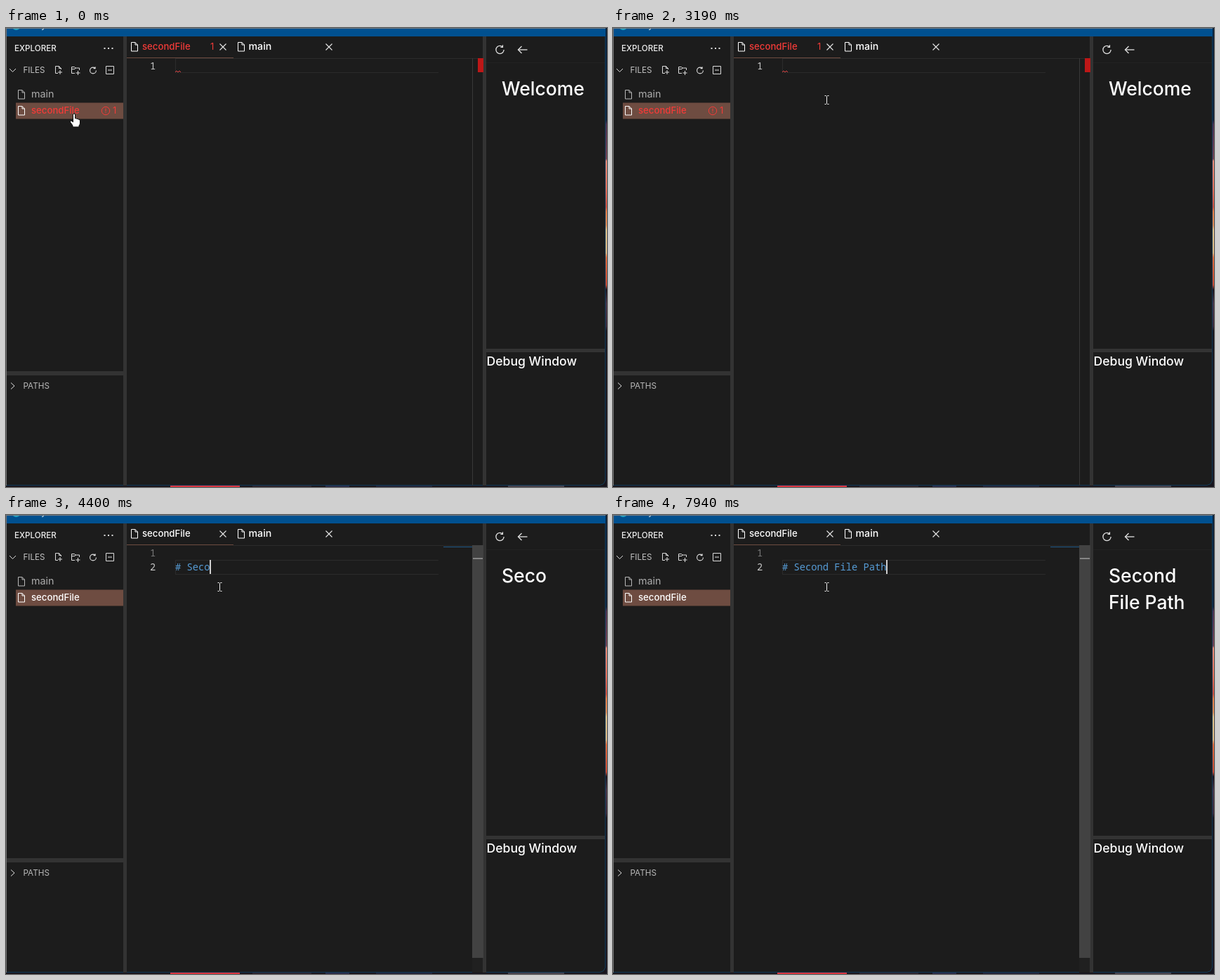
Recreate the animation shown at these times as an HTML page with a canvas. Size 856 by 654 pixels, loop 8 s.

```html
<!DOCTYPE html>
<html lang="en">
<head>
<meta charset="utf-8">
<title>Editor</title>
<style>
html, body { margin: 0; width: 100%; height: 100%; overflow: hidden; background: #1c1c1c; }
canvas { display: block; width: 856px; height: 654px; }
</style>
</head>
<body>
<canvas id="stage" width="856" height="654"></canvas>
<script>
const ctx = document.getElementById('stage').getContext('2d');
const LOOP = 8000;
const SANS = 'Inter, "Open Sans", sans-serif';
const MONO = '"Noto Sans Mono", "DejaVu Sans Mono", monospace';
const BG = '#1c1c1c', BAR = '#333333', RED = '#f23b38', WHITE = '#ffffff';
const CHAR = 8.25, CODE_X = 241;

// [start, typed text]; null = still the empty one-line file
const typing = [
  [0, null], [3460, ''], [3730, '# '], [3880, '# S'], [4020, '# Se'], [4400, '# Seco'],
  [4660, '# Secon'], [4790, '# Second'], [4920, '# Second '], [5050, '# Second F'],
  [5180, '# Second Fi'], [5310, '# Second Fil'], [5690, '# Second File'],
  [6350, '# Second File '], [6610, '# Second File P'], [6750, '# Second File Pa'],
  [6880, '# Second File Path']
];
const caretOn = [
  [0, false], [2690, true], [3190, false], [3460, true], [6200, false],
  [6350, true], [7410, false], [7940, true]
];
const pointer = [
  [0, hand, 97, 122], [250, arrow, 112, 147], [377, arrow, 138, 136],
  [503, beam, 206, 152], [630, beam, 230, 138], [757, beam, 268, 110],
  [883, beam, 287, 74], [1010, beam, 251, 57], [1770, beam, 249, 57],
  [1900, beam, 248, 57], [2810, beam, 276, 80], [2930, beam, 304, 102],
  [3880, hand, 304, 102], [4400, beam, 304, 102]
];

function at(list, t) {
  let now = list[0];
  for (const item of list) if (item[0] <= t) now = item;
  return now;
}

function rect(x, y, w, h, color) {
  ctx.fillStyle = color;
  ctx.fillRect(x, y, w, h);
}

function text(str, x, y, size, color, font = SANS, weight = 400) {
  ctx.font = `${weight} ${size}px ${font}`;
  ctx.fillStyle = color;
  ctx.fillText(str, x, y);
}

const code = (str, x, y, color, weight) => text(str, x, y, 13.75, color, MONO, weight);
const label = (str, x, y, size, color) => text(str, x, y, size, color, SANS, 500);

function line(points, color = '#dddddd', width = 1) {
  ctx.beginPath();
  points.forEach(([x, y], i) => i ? ctx.lineTo(x, y) : ctx.moveTo(x, y));
  ctx.strokeStyle = color;
  ctx.lineWidth = width;
  ctx.stroke();
}

function shape(d, x, y, stroke, fill, width = 1) {
  const path = new Path2D(d);
  ctx.save();
  ctx.translate(x, y);
  if (fill) { ctx.fillStyle = fill; ctx.fill(path); }
  if (stroke) { ctx.strokeStyle = stroke; ctx.lineWidth = width; ctx.stroke(path); }
  ctx.restore();
}

function hand(x, y) {
  shape('M-1.5 1Q0 -1 1.5 1V7Q3 6 4 7.5Q6 7 6.5 8.5Q8.500 8 8.500 10V14Q8 16 7 17V19H-2V17L-5.500 12Q-6 10 -4 10L-1.5 12Z',
    x, y, '#111111', WHITE);
}

function arrow(x, y) {
  shape('M0 0V16L3.700 12.500L6.300 18.500L8.700 17.500L6.200 11.700H11Z', x, y, '#111111', WHITE);
}

function beam(x, y) {
  shape('M-3 -6H-1L0 -5L1 -6H3M0 -5V5M-3 6H-1L0 5L1 6H3', x + .5, y + .5, '#f0f0f0');
}

function fileIcon(x, y, color) {
  shape('M0 0H5.500L9 3.500V12.500H0ZM5.500 0V3.500H9', x + .5, y + .5, color);
}

function cross(x, y) {
  shape('M-4.500 -4.500L4.500 4.500M4.500 -4.500L-4.500 4.500', x, y, '#e6e6e6', null, 1.1);
}

function refresh(x, y, r, width) {
  ctx.beginPath();
  ctx.arc(x, y, r, 0, Math.PI * 1.74);
  ctx.strokeStyle = '#e2e2e2';
  ctx.lineWidth = width;
  ctx.stroke();
  line([[x + r * .7, y - r * 1.2], [x + r * .7, y - r * .65], [x + r * .15, y - r * .65]], '#e2e2e2', width);
}

function wallpaper() {
  const strip = ctx.createLinearGradient(0, 0, 0, 654);
  [[0, '#08213b'], [.2, '#0c2038'], [.21, '#49314f'], [.285, '#704052'], [.29, '#e58a78'],
   [.35, '#e0705c'], [.39, '#c94f40'], [.4, '#e57f48'], [.43, '#d98a58'], [.44, '#dcc08c'],
   [.49, '#d8b684'], [.5, '#dd6a3c'], [.56, '#c44a34'], [.57, '#151019'], [.6, '#433347'],
   [.65, '#38283a'], [.66, '#14141d'], [1, '#17151f']].forEach(s => strip.addColorStop(...s));
  rect(0, 0, 856, 654, '#17151d');
  rect(853, 0, 3, 654, strip);
  rect(234, 652, 99, 2, '#d8343f');
  rect(351, 652, 84, 2, '#29232e');
  rect(455, 652, 34, 2, '#282c4a');
  rect(527, 652, 80, 2, '#202339');
  rect(715, 652, 80, 2, '#44404b');
}

function chrome() {
  wallpaper();
  ctx.fillStyle = BG;
  ctx.beginPath();
  ctx.roundRect(0, 0, 854, 652, [0, 0, 7, 0]);
  ctx.fill();
  line([[853.5, 0], [853.5, 645], [851, 649.5], [846, 651.5], [0, 651.5]], '#123b59');
  rect(0, 0, 854, 12, '#00508f');
  ctx.fillStyle = '#22a6c4';
  ctx.beginPath();
  ctx.arc(14.5, -3, 6, 0, Math.PI * 2);
  ctx.fill();
  text('Diary', 25, 0, 13, '#d5e3ef');
  rect(0, 0, 854, 1, '#747b82');
  rect(0, 0, 1, 652, '#747474');
  rect(167, 12, 5, 640, BAR);
  rect(679, 12, 5, 640, BAR);
  rect(1, 489, 167, 6, BAR);
  rect(684, 457, 169, 5, BAR);
}

function sidebar(error) {
  label('EXPLORER', 12, 33, 11.6, '#eeeeee');
  for (const x of [140.5, 146, 151.5]) rect(x - 1, 28, 2, 2, '#dddddd');
  line([[5, 58], [9.5, 62.5], [14, 58]]);
  text('FILES', 24.5, 64, 11.6, '#c4c4c4');
  shape('M4 10.500H.5V.5H5.500L8.500 3.500V5M5.500 .5V3.500H8.500M7 6V12M4 9H10', 70, 54, '#dddddd');
  shape('M5 9.500H.5V.5H4.500L6 2H11.500V5M.5 3.500H5L6 2M9.500 6V12M6.500 9H12.500', 93, 55, '#dddddd');
  refresh(124, 60.5, 4.4, 1.1);
  shape('M.5 .5H11.500V11.500H.5ZM3 6H9', 142, 54, '#dddddd');

  fileIcon(17, 88, '#b8b8b8');
  text('main', 36, 99, 14.3, '#adadad');
  rect(14, 106.5, 153, 23, '#6e4c41');
  fileIcon(17, 111, '#ffffff');
  label('secondFile', 36, 122, 13.2, error ? RED : WHITE);
  if (error) {
    ctx.beginPath();
    ctx.arc(142, 118, 5.7, 0, Math.PI * 2);
    ctx.strokeStyle = RED;
    ctx.lineWidth = 1;
    ctx.stroke();
    rect(141.5, 114.5, 1, 4.5, RED);
    rect(141.5, 120, 1, 1.2, RED);
    text('1', 152, 122, 13, RED);
  }
  line([[7, 505.5], [12, 510], [7, 514.5]]);
  text('PATHS', 24.5, 514, 11.7, '#b8b8b8');
}

function tabs(error) {
  fileIcon(178, 20, '#ffffff');
  label('secondFile', 194, 31, 13.2, error ? RED : WHITE);
  if (error) text('1', 291, 31, 13, RED);
  cross(309, 27);
  fileIcon(330, 20, '#ffffff');
  label('main', 345.5, 31, 14.2, WHITE);
  cross(460, 27);
  rect(172, 42, 152, 1, '#6e4c41');
  rect(324, 43, 355, 1, '#2b2b2b');
}

function hover() {
  rect(241, 64, 397, 55, '#454545');
  rect(242, 65, 395, 53, '#252526');
  code("Expecting token of type 'Heading' but found ``", 249, 83, '#cccccc');
  rect(242, 94, 395, 1, '#3c3c3c');
  rect(242, 95, 395, 23, '#2c2c2d');
  text('View Problem (Alt+F8)', 250, 111, 12, '#3794ff');
  text('No quick fixes available', 396, 111, 12, '#cccccc');
}

function suggest(x, second) {
  rect(x, 85, 458, 22, '#1d4f75');
  rect(x + 1, 86, 456, 20, '#04395e');
  text('abc', x + 2, 98, 9, WHITE, SANS, 700);
  [...'storytell'].forEach((c, i) => {
    const hit = i === 0 || (second && i === 6);
    code(c, x + 23 + i * CHAR, 100, hit ? '#2aaaff' : WHITE, hit ? 700 : 400);
  });
}

function editor(typed, caret, t) {
  const empty = typed === null;
  const top = empty ? 43 : 64;
  rect(CODE_X, top, 375, 1, '#2b2b2b');
  rect(CODE_X, top + 20, 375, 1, '#2b2b2b');
  rect(CODE_X, top, 1, 20, '#2b2b2b');
  code('1', 205, 59, empty ? '#c6c6c6' : '#777777');

  if (empty) {
    line([[241, 63], [243, 61], [245, 63], [247, 61], [249, 63]], '#e24444');
    rect(664, 43, 1, 609, '#393939');
    rect(672, 43, 8, 20, '#bd1717');
  } else {
    code('2', 205, 79, '#c6c6c6');
    code(typed, CODE_X, 79, '#569cd6');
    rect(623, 45, 41, 1, '#215a8a');
    rect(664, 43, 16, 588, '#424242');
    rect(664, 631, 15, 21, '#202020');
    rect(665, 61, 14, 2, '#858585');
  }
  if (caret) {
    const x = Math.floor(CODE_X + (typed || '').length * CHAR);
    rect(x, top, empty ? 1 : 2, 20, '#d0d0d0');
  }
  if (t >= 2280 && t < 2690) hover();
}

function preview(typed) {
  refresh(703.5, 31, 5.6, 1.3);
  line([[742.5, 31], [729.5, 31]], '#e2e2e2', 1.3);
  line([[734.5, 26], [729.5, 31], [734.5, 36]], '#e2e2e2', 1.3);
  rect(684, 49, 169, 1, '#222222');
  const title = typed === null ? 'Welcome' : typed.slice(2);
  const lines = title.startsWith('Second File') ? ['Second', title.slice(7)] : [title];
  lines.forEach((s, i) => label(s, 706, 96 + i * 38, 26.5, WHITE));
  label('Debug Window', 684.5, 481, 17.6, WHITE);
}

function draw(t) {
  const typed = at(typing, t)[1];
  const error = typed === null;
  chrome();
  sidebar(error);
  tabs(error);
  editor(typed, at(caretOn, t)[1], t);
  preview(typed);
  if (t >= 3880 && t < 4400) suggest(t < 4020 ? 265 : 274, t >= 4020);
  const [, cursor, x, y] = at(pointer, t);
  cursor(x, y);
}

const start = performance.now();
function tick() {
  draw((performance.now() - start) % LOOP);
  requestAnimationFrame(tick);
}
tick();
</script>
</body>
</html>
```
